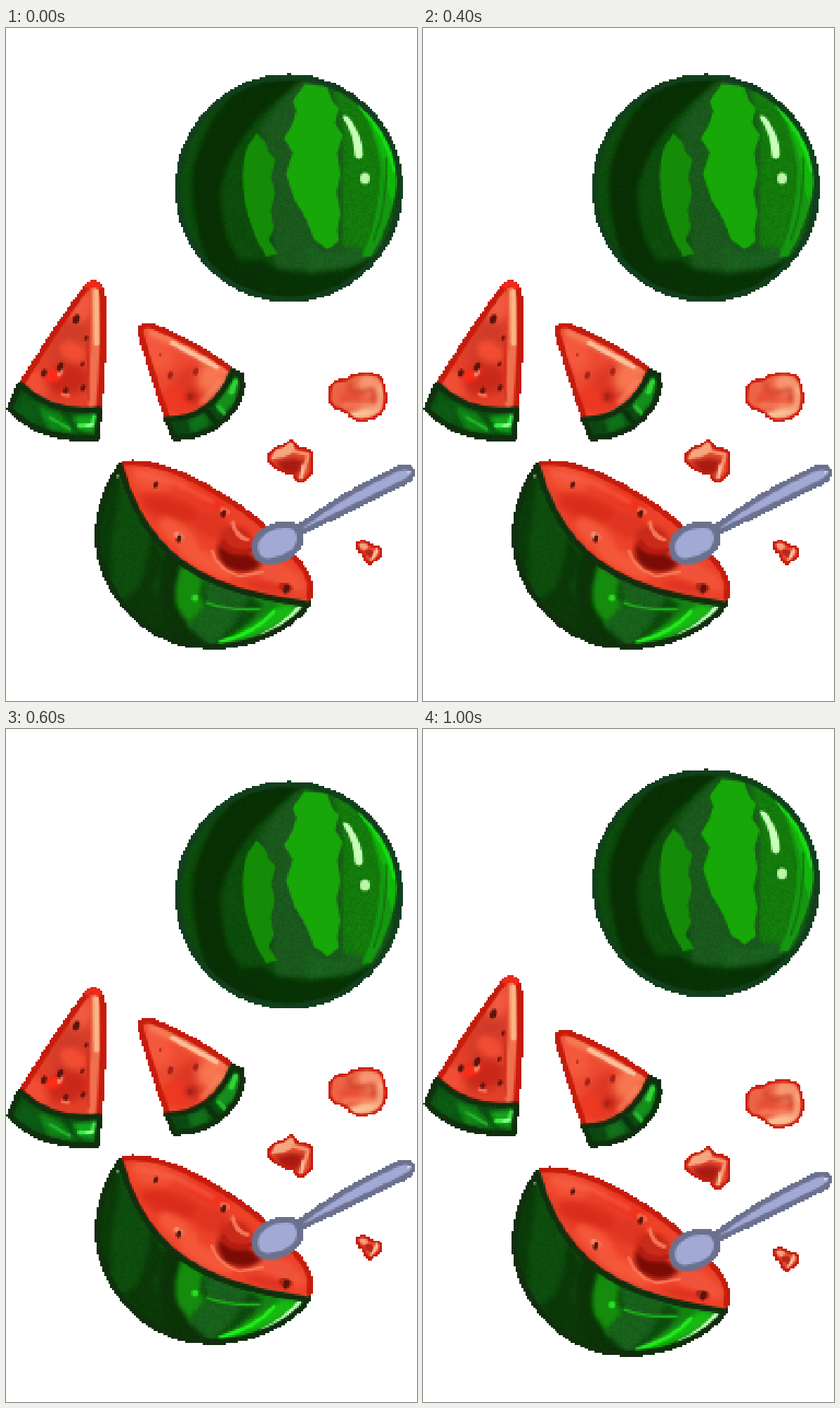
An HTML page with a canvas that plays this animation: 585 px wide and 957 px high, repeating every 1200 ms.

```html
<!DOCTYPE html>
<html lang="en">
<head>
<meta charset="utf-8">
<title>Watermelon</title>
<style>
html, body { margin: 0; width: 100%; height: 100%; overflow: hidden; background: #fff; }
canvas { display: block; width: 100vw; height: 100vh; image-rendering: pixelated; }
</style>
</head>
<body>
<canvas id="stage" width="209" height="342"></canvas>
<script>
const stage = document.getElementById('stage');
const view = stage.getContext('2d');
const W = 209, H = 342, PX = 2.8;
let g;

const fill = (d, color, soft = 0) => {
  g.filter = soft ? `blur(${soft}px)` : 'none';
  g.fillStyle = color;
  g.fill(new Path2D(d));
  g.filter = 'none';
};
const line = (d, color, width, soft = 0) => {
  g.filter = soft ? `blur(${soft}px)` : 'none';
  g.strokeStyle = color;
  g.lineWidth = width;
  g.stroke(new Path2D(d));
  g.filter = 'none';
};
const spot = (x, y, rx, ry, color, turn = 0, soft = 0) => {
  g.filter = soft ? `blur(${soft}px)` : 'none';
  g.fillStyle = color;
  g.beginPath();
  g.ellipse(x, y, rx, ry, turn, 0, 7);
  g.fill();
  g.filter = 'none';
};
const within = (d, paint) => {
  g.save();
  g.clip(new Path2D(d));
  paint();
  g.restore();
};
const seeds = (list, color = '#5c140c') => {
  for (const [x, y, r] of list) spot(x, y, r * 0.75, r * 1.2, color, 0.4, 0.4);
};

// Hard pixel edges, with a light grain on the rind greens.
function pixelate(c) {
  let s = 7;
  const img = c.getImageData(0, 0, W, H), p = img.data;
  for (let i = 0; i < p.length; i += 4) {
    p[i + 3] = p[i + 3] > 120 ? 255 : 0;
    s = (s * 16807) % 2147483647;
    if (p[i + 1] > p[i] * 1.5 && p[i + 1] < 130) {
      const k = 0.94 + 0.12 * s / 2147483647;
      for (let j = 0; j < 3; j++) p[i + j] *= k;
    }
  }
  c.putImageData(img, 0, 0);
}

function layer(...parts) {
  const c = document.createElement('canvas');
  c.width = W;
  c.height = H;
  g = c.getContext('2d');
  g.scale(1 / PX, 1 / PX);
  g.lineJoin = g.lineCap = 'round';
  parts.forEach(part => part());
  pixelate(g);
  return c;
}

function melon() {
  const body = 'M245 228a158 158 0 1 0 316 0a158 158 0 1 0 -316 0Z';
  fill(body, '#0c4c0b');
  within(body, () => {
    fill('M352 70L425 70Q390 96 355 132Q319 174 306 225C303 280 320 322 345 345L385 395L300 370C274 310 260 245 266 200Q290 110 352 70Z', '#082f03', 1);
    fill('M425 74Q385 105 362 142L385 345L530 340L560 220L500 90Z', '#1a581c', 1);
    fill('M460 75C475 110 485 150 478 210L480 310L520 325Q552 260 545 180Q530 110 490 85Z', '#137a0b', 1.2);
    fill('M357 150L370 163L374 177L384 187L377 212L383 235L377 260L381 284L374 302L387 321L371 325C344 285 325 210 346 165Z', '#158c07', 0.5);
    fill('M425 80L457 83L464 103L474 114L469 135L479 152L472 178L476 208L471 234L476 263L472 288L474 303L458 315L438 300L428 273L410 243L399 208L408 177L396 157L406 140L414 118L408 104Z', '#17a708', 0.7);
    fill('M499 105Q525 140 533 200Q532 275 506 327L520 325Q550 275 557 220Q550 150 499 105Z', '#159711', 0.6);
    fill('M500 104Q536 153 542 226L551 253L557 215Q553 145 500 104Z', '#13b50c', 0.5);
    line('M506 111Q543 150 554 202', '#16dc13', 8, 0.5);
    line('M541 185Q545 245 524 302', '#12760d', 3, 0.4);
    fill('M425 310L462 320L505 310L508 332L430 350Z', '#1a5f1f', 1.2);
    fill('M300 335L365 329L385 343L430 350L480 346L530 323L500 375L400 400L320 375Z', '#073205', 0.8);
    fill('M285 345Q320 333 362 367L382 390L320 380Z', '#092f06', 0.6);
  });
  fill('M479 125Q486 122 491 131Q508 154 508 181Q504 190 497 183Q496 153 479 125Z', '#c8ffb9');
  spot(511, 214, 7, 8, '#b9f7a9');
  g.strokeStyle = '#123f1d';
  g.lineWidth = 8;
  g.beginPath();
  g.arc(403, 228, 158, 0, Math.PI * 2);
  g.stroke();
}

function tallSlice() {
  const sides = 'M22 507Q68 432 110 375Q117 364 125 364Q136 362 138 384Q141 449 133 540';
  const flesh = sides + 'Q67 553 22 507Z';
  const rind = 'M20 507Q67 552 133 542L130 583Q46 588 5 541Z';
  fill(flesh, '#e34029');
  within(flesh, () => {
    spot(91, 450, 23, 44, '#cf3b29', 0.35, 2.5);
    spot(107, 396, 16, 25, '#f05a40', 0.3, 2);
    spot(45, 506, 23, 16, '#f14f35', 0.4, 1.5);
    spot(88, 501, 31, 21, '#c8281a', -0.2, 2);
    spot(69, 494, 15, 8, '#ff2c18', -0.5, 1);
    spot(95, 460, 20, 14, '#f24d32', 0.5, 1.5);
    line('M127 372L127 455L122 535', '#ef704f', 11, 0.7);
    line('M128 376L129 448', '#f8b684', 8, 0.6);
    line('M115 440L118 530', '#d42e1e', 3, 0.6);
    spot(77, 490, 4, 7, '#f78263', 0.4, 0.5);
    spot(85, 522, 7, 3, '#f77050', 0.2, 0.5);
  });
  seeds([[100, 414, 6], [77, 482, 6], [54, 491, 5], [114, 441, 3], [110, 512, 4], [85, 516, 4], [109, 478, 3]]);
  line(sides, '#c51c0d', 8);
  line('M116 367Q125 359 133 368', '#f12a19', 8);
  fill(rind, '#0b4a10');
  within(rind, () => {
    fill('M40 534L76 548L102 578L60 571Z', '#118517', 1);
    fill('M25 520L45 535L50 570L10 545Z', '#0b5b13', 0.8);
    fill('M94 552L129 550L126 577L104 572Z', '#14a51b', 0.8);
    line('M104 566L123 565L126 553', '#3de845', 6, 0.5);
    line('M115 566L123 565', '#aaffae', 4, 0.4);
    line('M62 554L91 571', '#24b52a', 4, 0.7);
  });
  line(rind, '#112f0e', 8);
}

function wideSlice() {
  const sides = 'M229 553Q212 505 191 432Q190 421 208 424Q265 446 321 486';
  const flesh = sides + 'Q296 556 229 556Z';
  const rind = 'M229 557Q296 556 323 488L336 495C342 539 300 584 240 583Z';
  fill(flesh, '#ed4b31');
  within(flesh, () => {
    spot(264, 512, 28, 34, '#de3825', 0.4, 2);
    spot(214, 462, 22, 29, '#f4583d', -0.5, 2);
    spot(292, 497, 20, 24, '#f77650', 0.4, 2);
    spot(241, 529, 23, 18, '#ed3822', 0.2, 1.5);
    line('M207 433Q258 454 311 489', '#f57c56', 11, 1);
    line('M237 448L300 482', '#fac09a', 7, 0.7);
    line('M279 533L308 500', '#f88d64', 5, 0.8);
    spot(263, 524, 9, 8, '#bf2719', 0, 1);
  });
  seeds([[234, 494, 5], [270, 489, 5], [262, 525, 4], [220, 465, 2]], '#a42318');
  line(sides, '#c51c0d', 8);
  fill(rind, '#0b4811');
  within(rind, () => {
    fill('M297 535L326 498L334 506L326 535L308 550Z', '#168e1c', 0.8);
    line('M321 518L327 503', '#2ed338', 8, 0.6);
    line('M303 539L313 550', '#27b82d', 6, 0.7);
    fill('M258 555L281 548L292 562L266 578Z', '#117019', 0.9);
    line('M288 547L304 567', '#09330c', 8, 0.7);
  });
  line(rind, '#112f0e', 8);
}

function half() {
  const rim = 'M163 623Q180 686 215 728C262 784 333 807 431 820';
  const rind = rim + 'C400 858 350 880 292 880C217 881 155 830 135 758C123 715 135 664 163 623Z';
  const top = 'M168 619Q216 614 281 650Q370 699 419 763Q435 784 433 799L432 811';
  const flesh = rim + 'L433 799Q435 784 419 763Q370 699 281 650Q216 614 166 619Z';
  fill(rind, '#0d4c0d');
  within(rind, () => {
    fill('M163 625Q160 681 150 725L150 787L130 760L120 690Z', '#0a3b08', 1.2);
    fill('M209 722L224 755L210 795L239 878L186 850L166 810Q190 810 199 765Z', '#0b3807', 1);
    fill('M230 735L262 766L245 815L265 855L292 885L238 878Q200 810 230 735Z', '#0b3307', 0.8);
    fill('M251 760L281 781L276 806L285 825L263 853L244 825Q235 801 251 760Z', '#158c0d', 0.8);
    fill('M281 780L350 804L322 850L296 882L257 850L286 821Z', '#18601b', 1.2);
    fill('M325 795L428 820L385 866L295 882Q357 848 365 820Z', '#148312', 1);
    fill('M420 824Q378 865 300 878Q358 850 393 820Z', '#18b813', 0.9);
    line('M382 830Q356 861 305 874', '#20ed1b', 5, 0.6);
    line('M286 818Q319 830 361 827', '#1cae17', 4, 0.5);
    line('M417 826Q396 850 365 865', '#c2ffba', 7, 0.5);
    spot(269, 811, 5, 5, '#28db22', 0, 0.4);
  });
  line(rind, '#112f0e', 8);
  fill(flesh, '#ec4229');
  within(flesh, () => {
    spot(207, 642, 31, 18, '#f35437', 0.4, 2);
    spot(235, 684, 46, 17, '#d92d1b', 0.3, 2);
    spot(289, 670, 35, 12, '#ed321d', 0.5, 1.5);
    spot(246, 721, 35, 15, '#f35739', 0.7, 1.5);
    spot(293, 707, 26, 18, '#df3521', 0.3, 1.5);
    spot(286, 760, 44, 13, '#f4573a', 0.5, 1.5);
    spot(385, 775, 48, 16, '#f05339', 0.5, 1.5);
    spot(374, 796, 33, 7, '#df3422', 0.2, 1);
    line('M184 633L245 648L294 674', '#f5634a', 5, 1);
    spot(327, 730, 25, 22, '#c92a19', 0.4, 1.2);
    line('M323 704Q327 723 344 728', '#f77758', 6, 0.7);
    fill('M303 732Q318 753 346 747L365 763Q346 780 320 771Q297 761 303 732Z', '#7b0b05', 0.8);
    line('M310 731Q320 750 347 743', '#b61c10', 7, 0.7);
    line('M293 744Q303 772 333 780L365 774', '#f77956', 4, 0.7);
    spot(246, 723, 8, 5, '#f98e6c', 0.5, 0.5);
    spot(312, 687, 8, 5, '#f46749', 0.4, 0.6);
    spot(398, 796, 10, 6, '#b62516', 0.3, 0.7);
  });
  seeds([[213, 650, 4], [310, 691, 5], [246, 727, 5], [399, 798, 6]], '#57150c');
  line(top, '#c51c0d', 8);
  line(rim, '#112f0e', 8);
  spot(159, 638, 2, 2, '#d5ead0');
}

function spoon() {
  const handle = 'M412 714Q480 662 557 627Q575 620 579 631Q580 641 566 647L423 717Z';
  const bowl = 'M355 744C350 723 374 707 397 707Q417 705 419 724C420 744 397 758 374 759Q358 758 355 744Z';
  fill(handle, '#a1a9d4');
  line(handle, '#6b718e', 8);
  fill(bowl, '#a1a9d4');
  line(bowl, '#6b718e', 9);
  spot(574, 632, 2, 2, '#fff');
}

function bits() {
  const big = 'M461 522Q461 503 474 502Q484 503 491 496Q510 490 529 494Q537 500 539 516Q543 528 537 543Q528 558 505 558Q492 557 486 547Q478 542 469 540Q459 533 461 522Z';
  const mid = 'M373 614Q375 601 386 597Q397 596 405 587Q412 589 415 597Q434 599 435 606L435 631Q428 645 419 645Q413 644 409 634Q387 633 373 614Z';
  const small = 'M500 734Q505 728 513 731Q519 739 529 737Q537 744 532 753Q522 759 518 762Q511 760 509 749Q500 743 500 734Z';
  fill(big, '#ed6545');
  within(big, () => {
    spot(519, 508, 18, 13, '#f79772', 0.4, 1);
    spot(509, 548, 25, 8, '#fac095', -0.2, 1);
    spot(490, 530, 16, 13, '#e95037', 0.4, 1);
    line('M490 505Q483 518 502 519L523 514L524 530', '#cd412c', 5, 0.8);
    line('M481 537Q500 535 527 540', '#f7946d', 5, 0.8);
    line('M535 512L531 541', '#fac9a0', 5, 0.8);
  });
  line(big, '#cd2112', 4);
  fill(mid, '#e34a31');
  within(mid, () => {
    fill('M385 596L406 588L413 602L396 611L377 614Z', '#f7a77f', 0.7);
    fill('M383 617L409 612L425 616L414 637L393 631Z', '#a81b10', 0.9);
    line('M408 602L431 607L423 634', '#f79570', 5, 0.7);
    line('M423 622L420 640', '#fac19b', 4, 0.5);
  });
  line(mid, '#c51c0d', 4);
  fill(small, '#e64b32');
  within(small, () => {
    spot(509, 737, 8, 5, '#f6a17a', 0.4, 0.5);
    spot(518, 747, 8, 5, '#b7271a', 0.5, 0.6);
    line('M529 742L521 757', '#fac29a', 5, 0.5);
  });
  line(small, '#c51c0d', 4);
}

const groups = [
  [layer(melon, tallSlice), 1],
  [layer(wideSlice, half, spoon, bits), -1]
];
const bob = [0, -3, 0, 3, 0, -3];
const start = performance.now();

function frame() {
  const t = (performance.now() - start) % 1200;
  const dy = bob[Math.floor(t / 200)];
  view.fillStyle = '#fff';
  view.fillRect(0, 0, W, H);
  for (const [art, way] of groups) view.drawImage(art, 0, dy * way);
  requestAnimationFrame(frame);
}
frame();
</script>
</body>
</html>
```
